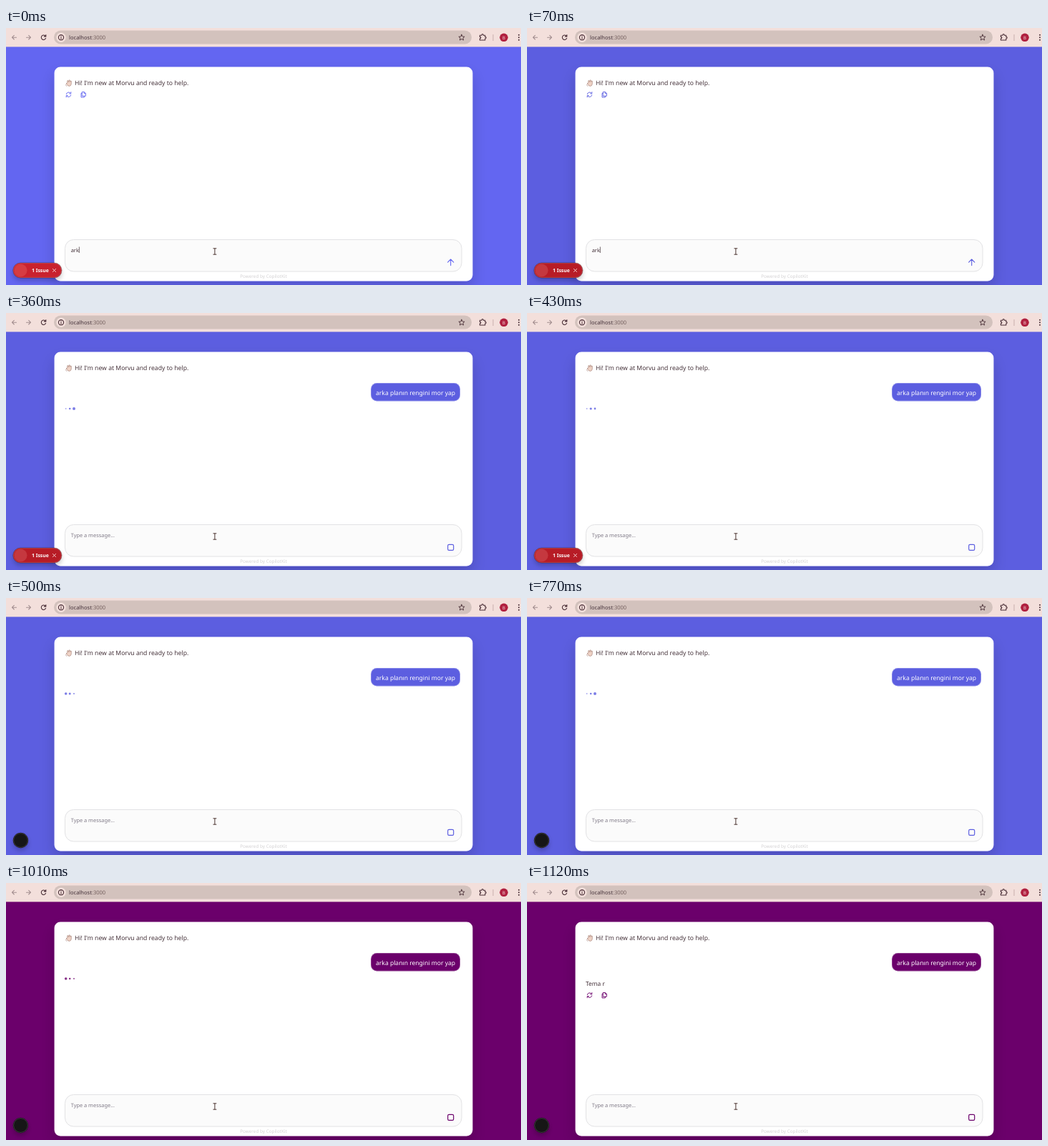
An HTML page that plays this animation: 720 px wide and 360 px high, repeating every 1190 ms.

```html
<!DOCTYPE html>
<html lang="en">
<head>
<meta charset="utf-8">
<title>Chat theme demo</title>
<style>
  html, body { margin: 0; width: 100%; height: 100%; overflow: hidden; }
  svg { display: block; width: 720px; height: 360px; }
  text { font: 8.65px "Noto Sans", "Open Sans", sans-serif; fill: #45323a; text-rendering: geometricPrecision; white-space: pre; }

  #stage, .anim { animation: 1190ms step-end infinite; }
  #stage { animation-name: theme; }
  .theme { fill: var(--theme); }
  .line { fill: none; stroke: var(--theme); stroke-linecap: round; stroke-linejoin: round; }
  .icon { stroke-width: .9; }
  .bar { fill: none; stroke: #4a2f37; stroke-width: 1.1; stroke-linecap: round; stroke-linejoin: round; }
  .faded { stroke: #a38f90; }
  .small { font-size: 7.4px; }
  .rim { fill: none; stroke: #fff; stroke-opacity: .2; stroke-width: .8; }

  .draft { animation-name: draft; }
  .sent { animation-name: sent; }
  .waiting { animation-name: waiting; }
  .reply { animation-name: reply; }
  .issue { animation-name: issue; }
  .badge { animation-name: badge; }
  .dot1 { animation-name: dot1; }
  .dot2 { animation-name: dot2; }
  .dot3 { animation-name: dot3; }

  @keyframes theme {
    0% { --theme: #6366f1; --alert: #c9222f; --alert-light: #d63c42; }
    5.88% { --theme: #5c5ee0; --alert: #b71d27; --alert-light: #c5383f; }
    78.99%, 100% { --theme: #6b006b; --alert: #b71d27; --alert-light: #c5383f; }
  }
  @keyframes draft { 0% { visibility: visible; } 30.25%, 100% { visibility: hidden; } }
  @keyframes sent { 0% { visibility: hidden; } 30.25%, 100% { visibility: visible; } }
  @keyframes waiting { 0% { visibility: hidden; } 30.25% { visibility: visible; } 94.11%, 100% { visibility: hidden; } }
  @keyframes reply { 0% { visibility: hidden; } 94.11%, 100% { visibility: visible; } }
  @keyframes issue { 0% { visibility: visible; } 42.01%, 100% { visibility: hidden; } }
  @keyframes badge { 0% { visibility: hidden; } 42.01%, 100% { visibility: visible; } }
  @keyframes dot1 { 0% { r: .8px; } 42.01% { r: 1.8px; } 64.7% { r: .8px; } 84.87%, 100% { r: 1.8px; } }
  @keyframes dot2 { 0% { r: 1.3px; } 36.13% { r: 1.6px; } 42.01% { r: 1.5px; } 64.7%, 100% { r: 1.3px; } }
  @keyframes dot3 { 0% { r: 2px; } 36.13% { r: 1.4px; } 42.01% { r: .9px; } 64.7% { r: 2px; } 84.87%, 100% { r: .9px; } }
</style>
</head>
<body>
<svg id="stage" viewBox="0 0 720 360">
  <defs>
    <filter id="shadow" x="-10%" y="-10%" width="120%" height="130%">
      <feDropShadow dx="0" dy="10" stdDeviation="10" flood-color="#000" flood-opacity=".17"/>
    </filter>
    <filter id="lift" x="-30%" y="-30%" width="160%" height="200%">
      <feDropShadow dx="0" dy="4" stdDeviation="3" flood-color="#000" flood-opacity=".2"/>
    </filter>
    <g id="actions" class="line icon">
      <path d="M-3.2-.6A3.3 3.3 0 0 1 2.8-1.8M3.2.6A3.3 3.3 0 0 1-2.8 1.8M3.3-3.6V-1.4H1.1M-3.3 3.6V1.4H-1.1"/>
      <path transform="translate(20.5 0)" d="M-1.4-3.7H1.3L3.4-1.6V2H-1.4ZM1.2-3.6V-1.5H3.3M-1.5-1.9H-3V3.8H1.4V2"/>
    </g>
  </defs>

  <rect class="theme" width="720" height="360"/>

  <!-- Browser bar -->
  <rect width="720" height="26.4" fill="#f3dfdb"/>
  <rect x="67" y="3.5" width="584" height="19" rx="9.5" fill="#d3c2bd"/>
  <path class="bar faded" d="M14.5 13.2H8.5M11.3 10.4L8.5 13.2L11.3 16M28.5 13.2H34.5M31.7 10.4L34.5 13.2L31.7 16"/>
  <path class="bar" d="M55.3 11.6A3.2 3.2 0 1 0 55.6 14.2M55.8 9.6V11.9H53.4"/>
  <circle cx="77" cy="13.2" r="6.7" fill="#f3dfdb"/>
  <circle class="bar" cx="77" cy="13.2" r="3.6"/>
  <path class="bar" d="M77 13V15M77 11.4V11.5"/>
  <text x="88" y="16" style="font-size:7.55px">localhost<tspan fill="#75605f">:3000</tspan></text>
  <path class="bar" style="stroke-width:.9" d="M637 9.2L638.2 11.9L641.1 12.2L638.9 14.1L639.6 17L637 15.5L634.4 17L635.1 14.1L632.9 12.2L635.8 11.9Z"/>
  <path class="bar" d="M662.4 10.3H665C664.8 8 667.6 8 667.4 10.3H669.8V12.4C671.6 12.3 671.6 14.9 669.8 14.8V17H662.4V14.9C664.3 14.9 664.3 12.3 662.4 12.4Z"/>
  <path d="M681 9V18" stroke="#c9aeae"/>
  <circle cx="696" cy="13.3" r="5.8" fill="#b02040"/>
  <text x="696" y="15.6" text-anchor="middle" style="font-size:6px;fill:#f6dcdc">B</text>
  <g fill="#4a2f37">
    <circle cx="717" cy="9.8" r="1"/><circle cx="717" cy="13.3" r="1"/><circle cx="717" cy="16.8" r="1"/>
  </g>

  <!-- Chat card -->
  <rect x="67.6" y="54.5" width="584.8" height="300.1" rx="8.5" fill="#fff" filter="url(#shadow)"/>
  <g stroke="#8f655b" stroke-width=".5" stroke-linecap="round" stroke-linejoin="round">
    <path fill="#efd3c6" d="M84.8 77.3L86 76.6L85.6 73.9Q86.2 73 86.9 73.8L87.6 75.6L88 73Q88.8 72.4 89.3 73.2L89.5 75.4L90.6 74Q91.5 74 91.4 75L91.2 79Q90.5 81.6 88.2 81.4Q86 81 84.5 78.4Q84.1 77.6 84.8 77.3Z"/>
    <path fill="none" d="M83.4 79.4Q83.8 81 85 81.6"/>
  </g>
  <text x="96" y="80.3">Hi! I'm new at Morvu and ready to help.</text>
  <use class="anim draft" href="#actions" x="87.5" y="93.3"/>

  <g class="anim sent">
    <rect class="theme" x="510" y="98" width="125" height="25.5" rx="8.5"/>
    <rect class="rim" x="510.4" y="98.4" width="124.2" height="24.7" rx="8.1" style="stroke-opacity:.35"/>
    <text x="517" y="114.5" style="fill:#fff;font-size:8.55px">arka planın rengini mor yap</text>
  </g>
  <g class="anim waiting theme" opacity=".8">
    <circle class="anim dot1" cx="83.7" cy="134" r=".8"/>
    <circle class="anim dot2" cx="89.2" cy="134" r="1.3"/>
    <circle class="anim dot3" cx="95" cy="134" r="2"/>
  </g>
  <g class="anim reply">
    <text x="82" y="144.2" style="font-size:8.4px">Tema r</text>
    <use href="#actions" x="87.5" y="157.2"/>
  </g>

  <!-- Message box -->
  <rect x="82.5" y="296.5" width="554.5" height="44.5" rx="12" fill="#fbfbfb" stroke="#e2e2e4"/>
  <g class="anim draft">
    <text id="typed" class="small" x="90.7" y="313.5"></text>
    <path id="caret" d="M0 306.5V315" stroke="#3a2a30" stroke-width=".7"/>
    <path class="line" stroke-width="1.1" d="M621.7 332.6V324M617.6 328.1L621.7 324L625.8 328.1"/>
  </g>
  <g class="anim sent">
    <text class="small" x="90.7" y="313.7" style="fill:#807b88">Type a message...</text>
    <rect class="line" stroke-width="1.2" x="617.7" y="324.4" width="8" height="8" rx="1.6"/>
  </g>
  <text x="360" y="350.4" text-anchor="middle" style="font-size:6.36px;fill:#d3d1d3">Powered by CopilotKit</text>
  <path d="M289.5 308.8H294.3M291.9 308.8V317.2M289.5 317.2H294.3" fill="none" stroke="#4a332f"/>

  <!-- Dev badge -->
  <g class="anim issue">
    <rect x="9.8" y="329" width="68.2" height="21" rx="10.5" stroke="#171717" stroke-opacity=".45" stroke-width=".7" filter="url(#lift)" style="fill:var(--alert)"/>
    <rect class="rim" x="10.4" y="329.6" width="67" height="19.8" rx="9.9"/>
    <circle cx="20.5" cy="339.5" r="9" style="fill:var(--alert-light)"/>
    <text x="36" y="342" style="font-size:6.9px;font-weight:600;fill:#fff">1 Issue</text>
    <path d="M65.2 337.2L69.8 341.8M69.8 337.2L65.2 341.8" stroke="#fbe4e4" stroke-width=".9"/>
  </g>
  <g class="anim badge">
    <circle cx="20.5" cy="339.5" r="10.7" fill="#141216" filter="url(#lift)"/>
    <circle class="rim" cx="20.5" cy="339.5" r="9.9"/>
  </g>
</svg>
<script>
  const phrase = "arka planın rengini mor yap";
  const stage = document.getElementById("stage");
  const typed = document.getElementById("typed");
  const caret = document.getElementById("caret");
  const clock = stage.getAnimations()[0];

  // Typing advances eight letters every 70 ms after a short pause
  function draw() {
    const step = Math.floor(((clock.currentTime || 0) % 1190) / 70);
    const text = phrase.slice(0, 3 + 8 * Math.max(0, step - 1));
    if (typed.textContent !== text) {
      typed.textContent = text;
      caret.setAttribute("transform", `translate(${91.2 + typed.getComputedTextLength()} 0)`);
    }
    requestAnimationFrame(draw);
  }
  draw();
</script>
</body>
</html>
```
